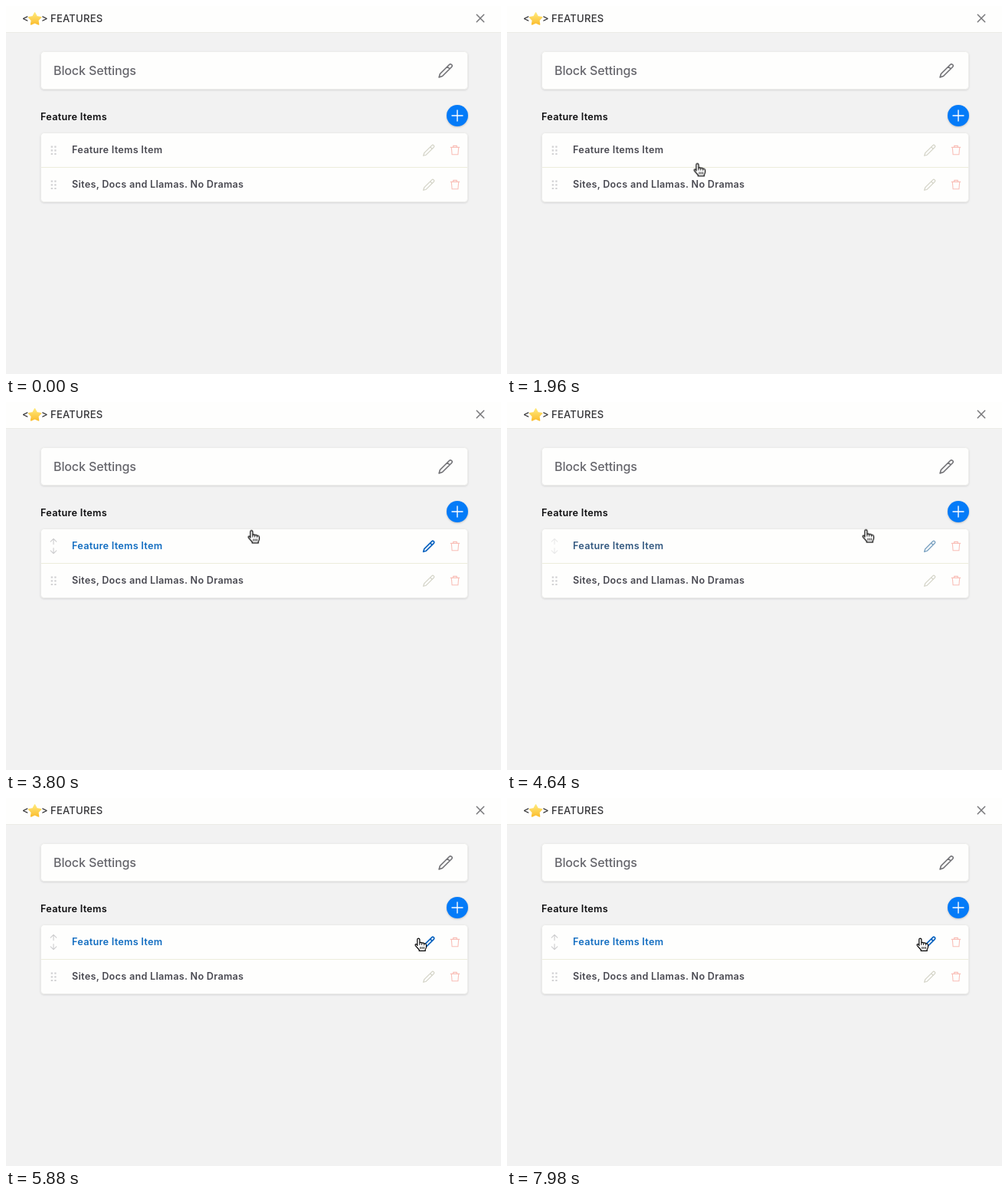
An HTML page for the animation above (8000 ms loop, 646x480 px).

```html
<!DOCTYPE html>
<html lang="en">
<head>
<meta charset="utf-8">
<title>Features panel</title>
<style>
  html, body { margin: 0; width: 100%; height: 100%; overflow: hidden; background: #f2f2f2; }
  svg { display: block; }
  text { font: 600 12.6px Inter, "Liberation Sans", sans-serif; letter-spacing: .3px; fill: #484850; }
  .head { font-weight: 500; font-size: 13px; letter-spacing: .25px; fill: #333336; }
  .title { font-weight: 500; font-size: 16px; letter-spacing: -.12px; fill: #66666c; }
  .label { fill: #0c0c0e; }
  .card { fill: #fefefd; stroke: #ececea; filter: drop-shadow(0 1px 1px rgba(40, 40, 50, .14)); }
  .add { fill: #047bf8; filter: drop-shadow(0 1px 1px rgba(40, 40, 50, .25)); }
  .line { fill: none; stroke: currentColor; stroke-linecap: round; stroke-linejoin: round; }
  .pencil { color: #d3d3c6; stroke-width: 1.2; }
  .trash { color: #f9bfb8; stroke-width: 1.1; }
  .dots { fill: #d0d0d2; }
  .arrows { color: #cdcdcf; stroke-width: 1.1; }
</style>
</head>
<body>
<svg width="646" height="480" viewBox="0 0 646 480">
  <defs>
    <linearGradient id="gold" x2="0" y2="1">
      <stop offset="0" stop-color="#ffe97a"/>
      <stop offset="1" stop-color="#fbbe30"/>
    </linearGradient>
    <path id="pencil" d="M-7.3 7.3 -6.2 3.7 3.7 -6.2Q4.9 -7.4 6.1 -6.2L6.2 -6.1Q7.4 -4.9 6.2 -3.7L-3.7 6.2ZM1.6 -4.1 4.1 -1.6"/>
    <path id="trash" d="M-5.7 -3.6H5.7M-2.4 -3.8V-5.6H2.4V-3.8M-4.7 -3.4 -3.9 5.7H3.9L4.7 -3.4"/>
    <path id="dots" d="M-3.3 -5.5h2.2v2.2h-2.2zM1.3 -5.5h2.2v2.2h-2.2zM-3.3 -.8h2.2v2.2h-2.2zM1.3 -.8h2.2v2.2h-2.2zM-3.3 3.9h2.2v2.2h-2.2zM1.3 3.9h2.2v2.2h-2.2z"/>
  </defs>

  <rect width="646" height="480" fill="#f2f2f2"/>

  <!-- Header -->
  <rect width="646" height="34" fill="#fefefd"/>
  <rect y="34" width="646" height="1" fill="#ebebe6"/>
  <text class="head" x="21" y="21">&lt;</text>
  <path d="M37.6 8.8 40.2 13.8 45.6 14.7 41.8 18.7 42.6 24 37.6 21.7 32.6 24 33.4 18.7 29.6 14.7 35 13.8Z"
        fill="url(#gold)" stroke="url(#gold)" stroke-width="1.5" stroke-linejoin="round"/>
  <text class="head" x="46" y="21">&gt;</text>
  <text class="head" x="58" y="21">FEATURES</text>
  <path class="line" color="#77777a" stroke-width="1.5" d="M614.3 11.3 623.7 20.7M623.7 11.3 614.3 20.7"/>

  <!-- Settings -->
  <rect class="card" x="45.5" y="59.5" width="557" height="49" rx="4"/>
  <text class="title" x="62" y="90">Block Settings</text>
  <use class="line" href="#pencil" color="#707074" stroke-width="1.3" transform="translate(574 84) scale(1.22)"/>

  <!-- Items -->
  <text class="label" x="45" y="149">Feature Items</text>
  <circle class="add" cx="589" cy="143" r="14"/>
  <path class="line" color="#fff" stroke-width="1.4" d="M582 143H596M589 136V150"/>
  <rect class="card" x="45.5" y="165.5" width="557" height="90" rx="4"/>
  <rect x="46" y="210" width="556" height="1" fill="#ececdc"/>
  <g id="rows"></g>

  <g id="cursor" opacity="0">
    <path d="M-2.2 10V1.6Q-2.2 .2 -.7 .2T.9 1.6V6Q2.4 4.7 3.7 6.2Q5.4 5.2 6.6 6.9Q9.3 6.3 9.5 9V11Q9.4 13 8.2 14.5V16.4H.2V15Q-1.6 13 -4.4 9.9Q-5.4 8.4 -4.4 7.7Q-3.2 7.1 -2.2 8.8"
          fill="#fff" stroke="#000" stroke-width="1.2" stroke-linejoin="round"/>
    <path d="M.9 6V9M3.7 6.2V9M6.6 6.9V9.4M1.9 11V14M4.1 11V14M6.3 11V14" fill="none" stroke="#000" stroke-width=".9"/>
  </g>
</svg>

<script>
  const LOOP = 8000;
  const $ = s => document.querySelector(s);

  // steps: [ms, value, easing to the next step]
  function play(el, prop, steps) {
    const full = [[0, steps[0][1]], ...steps, [LOOP, steps[steps.length - 1][1]]];
    el.animate(
      full.map(([t, v, easing = 'linear']) => ({ offset: t / LOOP, [prop]: v, easing })),
      { duration: LOOP, iterations: Infinity });
  }

  $('#rows').innerHTML = ['Feature Items Item', 'Sites, Docs and Llamas. No Dramas'].map((name, i) => {
    const y = 188 + 45 * i;
    return `<g id="row${i}">
      <use class="dots" href="#dots" transform="translate(62 ${y})"/>
      <path class="line arrows" opacity="0" transform="translate(62 ${y})"
        d="M0 -2.5V-9.5M-3.8 -5.8 0 -9.6 3.8 -5.8M0 2.5V9.5M-3.8 5.8 0 9.6 3.8 5.8"/>
      <text x="86" y="${y + 4}">${name}</text>
      <use class="line pencil" href="#pencil" transform="translate(552 ${y})"/>
      <use class="line trash" href="#trash" transform="translate(586 ${y})"/>
    </g>`;
  }).join('');

  // The first row lights up, fades as the pointer slips off its top edge, then lights up again.
  const hover = (off, on) => [
    [1970, off], [2150, on], [4180, on], [4340, off], [4570, off], [4740, on]
  ];
  const row = s => $('#row0 ' + s);
  play(row('text'), 'fill', hover('#484850', '#106cc0'));
  play(row('.pencil'), 'color', hover('#d3d3c6', '#0a64c0'));
  play(row('.pencil'), 'strokeWidth', hover('1.2px', '1.7px'));
  play(row('.arrows'), 'opacity', hover(0, 1));
  play(row('.dots'), 'opacity', [
    [1970, 1, 'step-start'], [1990, 0], [4320, 0, 'step-end'],
    [4340, 1, 'step-end'], [4570, 0]
  ]);

  const at = (x, y) => `translate(${x}px, ${y}px)`;
  play($('#cursor'), 'transform', [
    [1560, at(196, 402), 'cubic-bezier(.3, .5, .6, 1)'],
    [1960, at(249, 205.5), 'ease-out'],
    [2360, at(282, 178)],
    [3100, at(304, 172)],
    [3800, at(321, 167.5)],
    [4040, at(338, 166), 'ease-in'],
    [4320, at(394, 160)],
    [4640, at(469, 166.5), 'ease-out'],
    [5340, at(532, 179.5), 'ease-out'],
    [5720, at(539, 183)],
    [6700, at(539, 183)],
    [7400, at(540, 183)]
  ]);
  play($('#cursor'), 'opacity', [[0, 0, 'step-end'], [1560, 1]]);
</script>
</body>
</html>
```
